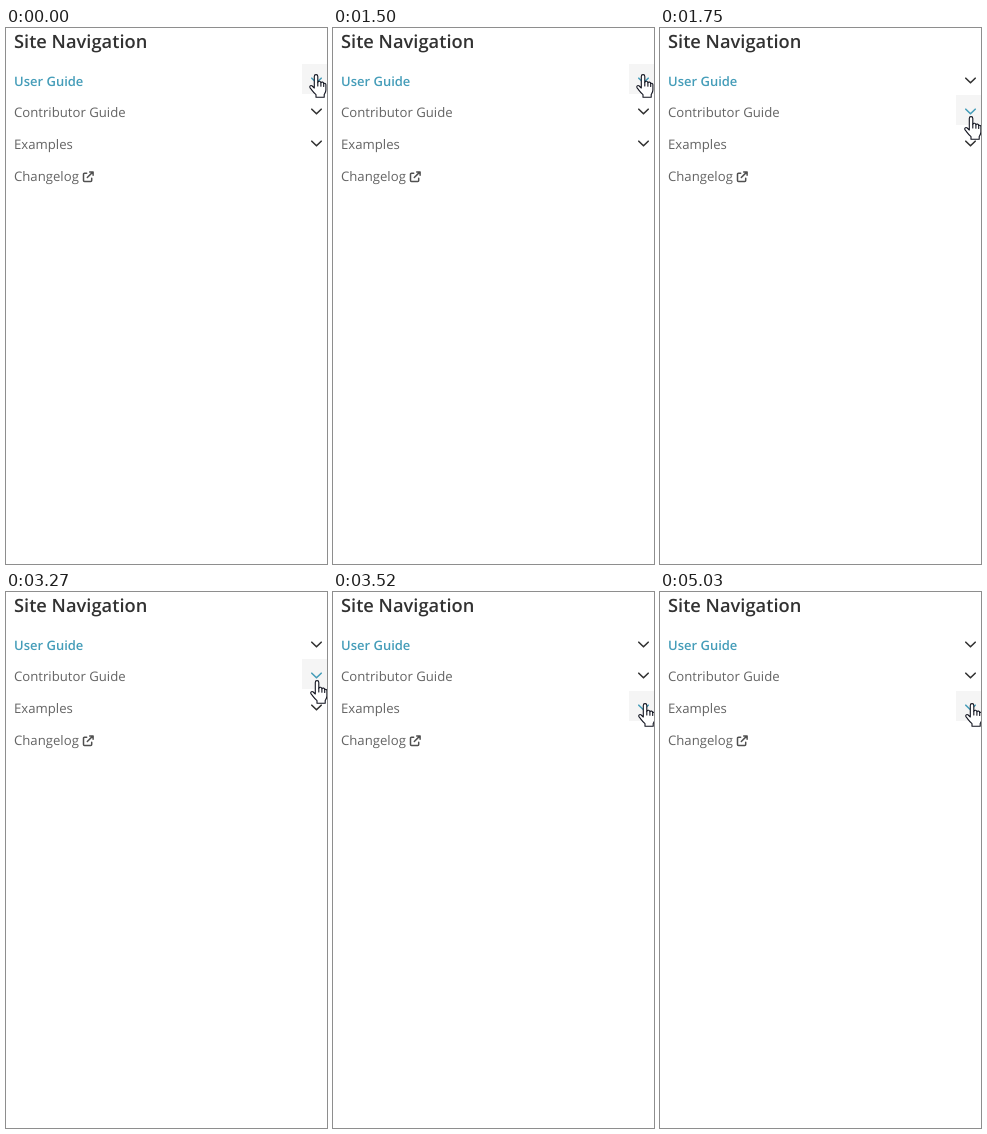
An HTML page for the animation above (5280 ms loop, 321x536 px).

```html
<!DOCTYPE html>
<html lang="en">
<head>
<meta charset="utf-8">
<title>Site Navigation</title>
<style>
  html, body { margin: 0; width: 100%; height: 100%; overflow: hidden; background: #fff; }
  svg { display: block; width: 321px; height: 536px; overflow: hidden; }
  text { font: 400 13.17px "Open Sans", "Noto Sans", sans-serif; fill: #646464; text-rendering: geometricPrecision; }
  .title { font-size: 18.3px; font-weight: 600; fill: #323232; }
  .active { font-size: 13px; font-weight: 600; fill: #459db9; }
  .caption { font-size: 12.98px; font-weight: 600; fill: #323232; }
  .chevron { fill: none; stroke: #323232; stroke-width: 1.6; stroke-linecap: round; stroke-linejoin: round; }
  .chevron.hot { stroke: #459db9; }
  .hover { fill: #f5f5f5; }
  .link { fill: none; stroke: #505050; stroke-width: 1.5; stroke-linecap: round; stroke-linejoin: round; }
  .hand { fill: #fff; stroke: #11131f; stroke-width: 1.1; stroke-linejoin: round; stroke-linecap: round; }
  .scene { visibility: hidden; animation: 5280ms step-end infinite; }

  #idle0 { animation-name: idle0; }
  #open0 { animation-name: open0; }
  #idle1 { animation-name: idle1; }
  #open1 { animation-name: open1; }
  #idle2 { animation-name: idle2; }
  #open2 { animation-name: open2; }
  @keyframes idle0 {
    0%, 28.4091% { visibility: visible; }
    4.7348%, 33.1439%, 100% { visibility: hidden; }
  }
  @keyframes open0 {
    0%, 28.4091%, 100% { visibility: hidden; }
    4.7348% { visibility: visible; }
  }
  @keyframes idle1 {
    0%, 38.2576%, 66.6667%, 100% { visibility: hidden; }
    33.1439%, 61.9318% { visibility: visible; }
  }
  @keyframes open1 {
    0%, 61.9318%, 100% { visibility: hidden; }
    38.2576% { visibility: visible; }
  }
  @keyframes idle2 {
    0%, 71.4015% { visibility: hidden; }
    66.6667%, 95.2652%, 100% { visibility: visible; }
  }
  @keyframes open2 {
    0%, 95.2652%, 100% { visibility: hidden; }
    71.4015% { visibility: visible; }
  }
</style>
</head>
<body>
<svg id="stage" viewBox="0 0 321 536">
  <defs>
    <g id="hand" class="hand">
      <path d="M5.3 14V2.4a1.75 1.75 0 0 1 3.5 0V8.3a1.6 1.6 0 0 1 3.1.5a1.5 1.5 0 0 1 2.8.7a1.4 1.4 0 0 1 2.2 1.2V16c0 2-.9 3.1-1.7 4.6V23.3H7V20.7C4.5 18.6 3 16.2 1.1 13.9C.1 12.3 1.7 10.8 3.2 12Z"/>
      <path d="M8.8 8.3V12M11.9 8.8V12.2M14.7 9.5V12.5"/>
    </g>
    <g id="link" class="link">
      <path d="M4.2 2.2H2a1 1 0 0 0-1 1V9.4a1 1 0 0 0 1 1H8.2a1 1 0 0 0 1-1V7.2"/>
      <path d="M4.8 6.4L10.2 1M7.2 .8H10.6V4.2"/>
    </g>
  </defs>
  <text class="title" x="8" y="20">Site Navigation</text>
  <text class="active" x="8" y="58">User Guide</text>
</svg>
<script>
  // Rows are [baseline, text]; "#" marks a caption, ">" a row with a chevron.
  const panels = [
    [
      [86, "#Get started"],
      [122, "Installation"],
      [154, "Theme Structure and Layout"],
      [202, "#Navigation and links"],
      [238, "Navigation depth"],
      [270, "Page Table of Contents"],
      [301, "Header links"],
      [333, "Source Buttons"],
      [365, "Announcement banners"],
      [413, "#Look and feel"],
      [449, "Theme variables and CSS"],
      [480, "Light and dark themes"],
      [512, "Branding and logo"],
      [544, "Fonts and icons"]
    ],
    [
      [117, "#Contributor guide"],
      [153, "Get started with development"],
      [185, "Structure of this theme"],
      [216, ">Topic guides"],
      [264, "#Team practices"],
      [300, "Merge and review policy"],
      [332, "Making releases"],
      [363, "Supported Python and Sphinx versions"],
      [411, "#About the project"],
      [447, "Contributors to this theme"],
      [479, "Inspiration for design and UX"]
    ],
    [
      [149, "#Real-world examples"],
      [185, "Gallery of sites using this theme"],
      [216, "Indexing and selecting data with Pandas"],
      [264, "#Theme-specific styles"],
      [300, ">Kitchen Sink"],
      [332, "PyData Library Styles"],
      [363, ">Advanced API documentation and"],
      [387, "generated content"],
      [435, "#Reference and test section. Mostly meant for"],
      [459, "#developers to check that things look OK."],
      [495, "1. Test of no sidebar"],
      [526, "2. Test of persistent search field"]
    ]
  ];
  const hands = [[303, 46], [304, 88], [305, 111]];
  const tops = [58, 89, 121, 153];
  const names = ["", "Contributor Guide", "Examples", "Changelog"];

  const label = (x, y, s, cls = "") => `<text class="${cls}" x="${x}" y="${y}">${s}</text>`;

  function chevron(base, up, hot) {
    const y = base - (up ? 5.6 : 7.8);
    const d = up ? -4.6 : 4.6;
    return `<path class="chevron${hot ? " hot" : ""}" d="M305.8 ${y}l4.7 ${d} 4.7 ${-d}"/>`;
  }

  function panelRow([y, s]) {
    const caption = s[0] === "#", parent = s[0] === ">";
    const text = caption || parent ? s.slice(1) : s;
    return label(24, y, text, caption ? "caption" : "") + (parent ? chevron(y) : "");
  }

  function scene(hover, open) {
    const rows = open ? panels[hover] : [];
    const end = open ? rows[rows.length - 1][0] + 32 : 0;
    let out = `<rect class="hover" x="296" y="${tops[hover] - 22}" width="30" height="30"/>`;
    tops.forEach((top, i) => {
      const y = open && i > hover ? end + 32 * (i - hover - 1) : top;
      if (i) out += label(8, y, names[i]);
      if (i < 3) out += chevron(y, open && i === hover, i === hover);
      else out += `<use href="#link" x="76.5" y="${y - 9.9}"/>`;
    });
    out += rows.map(panelRow).join("");
    const [x, y] = hands[hover];
    out += `<use href="#hand" x="${x}" y="${y}"/>`;
    return `<g class="scene" id="${open ? "open" : "idle"}${hover}">${out}</g>`;
  }

  document.getElementById("stage").insertAdjacentHTML("beforeend",
    [0, 1, 2].map(i => scene(i, false) + scene(i, true)).join(""));
</script>
</body>
</html>
```
